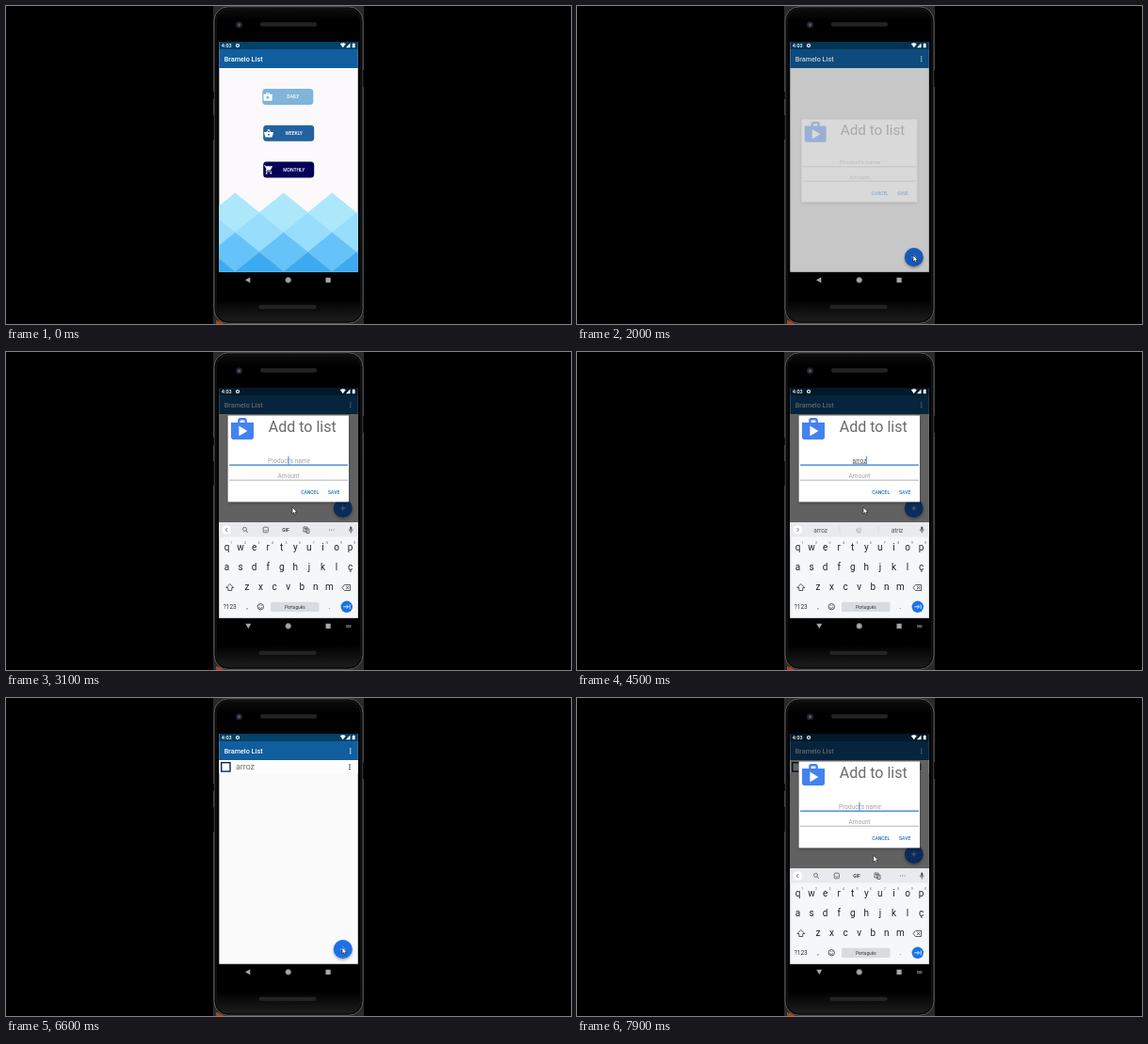
Recreate the animation shown at these times as an HTML page. Size 600 by 338 pixels, loop 8 s.

```html
<!DOCTYPE html>
<html lang="en">
<head>
<meta charset="utf-8">
<title>Shopping list demo</title>
<style>
html, body { margin: 0; width: 100%; height: 100%; overflow: hidden; background: #000; }
svg { display: block; width: 100vw; height: 100vh; font-family: Roboto, sans-serif; }
.mid { text-anchor: middle; }
.med { font-weight: 500; }
</style>
</head>
<body>
<svg viewBox="0 0 600 338">
  <defs>
    <clipPath id="view"><rect x="226.300" y="38" width="147.500" height="244.700"/></clipPath>
    <linearGradient id="body" x2="0" y2="1">
      <stop offset="0" stop-color="#0d0d0d"/><stop offset=".04" stop-color="#000"/>
      <stop offset=".93" stop-color="#000"/><stop offset="1" stop-color="#1d1d1d"/>
    </linearGradient>
    <filter id="shade" x="-20%" y="-20%" width="140%" height="150%">
      <feDropShadow dx="0" dy="1.5" stdDeviation="1.5" flood-opacity=".35"/>
    </filter>
    <path id="shop" fill-rule="evenodd" d="M16 6V4c0-1.1-.9-2-2-2h-4c-1.1 0-2 .9-2 2v2H2v13c0 1.1.9 2 2 2h16c1.1 0 2-.9 2-2V6zM10 4h4v2h-4zM9 18V9l7.5 4.5z"/>
    <path id="basket" fill-rule="evenodd" d="M17.2 9 12.8 2.4Q12 1.6 11.2 2.4L6.8 9H1l2.6 10.5Q4 21 5.5 21h13q1.5 0 1.9-1.5L23 9zM9 9l3-4.4L15 9zM12 13a2 2 0 1 0 0 4a2 2 0 1 0 0-4z"/>
    <g id="cart">
      <path d="M1 2h3.3l.9 2H21l-4.5 8.5q-.5.5-1 .5H8.1l-1 2H19v2H7q-3-.5-1.8-3L6.6 11.6 3 4H1z"/>
      <circle cx="7" cy="20" r="2"/><circle cx="17" cy="20" r="2"/>
    </g>
    <g id="bar">
      <path d="M226 38h148v8H226z" fill="#044068"/>
      <path d="M226 46h148v20H226z" fill="#105e9e"/>
      <text class="med" x="231.7" y="58.9" font-size="7.25" fill="#fff">Bramelo List</text>
    </g>
    <g id="dots"><circle cy="-2.3" r=".8"/><circle r=".8"/><circle cy="2.3" r=".8"/></g>
  </defs>

  <rect width="600" height="338"/>
  <rect x="220" width="160" height="338" fill="#2a2a2a"/>
  <rect x="221" y=".8" width="158" height="336.5" rx="15" fill="#080808" stroke="#5c5c5c"/>
  <rect x="223.3" y="3" width="153.4" height="332" rx="13" fill="url(#body)" stroke="#1c1c1c" stroke-width=".7"/>
  <path d="M220.5 91v8M220.5 116v26M379.5 68v18" stroke="#111"/>
  <path d="M272 19.5h56M270.5 319.8h57" stroke="#232323" stroke-width="4.3" stroke-linecap="round"/>
  <circle cx="247.5" cy="20" r="3.5" fill="#20232b"/><circle cx="247.5" cy="20" r="1.7" fill="#4c5468"/>
  <path d="M223 338v-4l4 1 5 3z" fill="#a3441d"/>

  <g clip-path="url(#view)">
    <g id="home">
      <path d="M226 38h148v245H226z" fill="#fbf9fc"/>
      <g id="tiles"></g>
      <use href="#bar"/>
      <g id="choices"></g>
    </g>
    <g id="list">
      <path d="M226 38h148v245H226z" fill="#fafafa"/>
      <use href="#bar"/>
      <use href="#dots" x="365.7" y="56.3" fill="#fff"/>
      <g id="row">
        <path d="M226 66h148v14H226z" fill="#fdfdfd"/>
        <rect x="228.7" y="68.7" width="9.3" height="9.3" fill="#fff" stroke="#102458" stroke-width="1.4"/>
        <text x="244" y="76.1" font-size="8.8" fill="#707070">arroz</text>
        <use href="#dots" x="365" y="73.3" fill="#222"/>
      </g>
      <g id="fab" filter="url(#shade)">
        <circle cx="357.8" cy="267" r="10" fill="#1a70e8"/>
        <path d="M355.3 267h5M357.8 264.5v5" stroke="#fff" stroke-width=".9"/>
      </g>
    </g>
    <path id="dim" d="M226 38h148v245H226z"/>
    <g id="dialog">
      <path d="M235.7 118.5h128.3v91.8H235.7z" fill="#fff" filter="url(#shade)"/>
      <use href="#shop" transform="translate(236.6 118.7) scale(1.2)" fill="#4481f2"/>
      <text x="278.8" y="136" font-size="16" fill="#6b6b6b">Add to list</text>
      <g class="mid" font-size="6.5">
        <text id="hint" x="300.5" y="168.5" fill="#a0a0a0">Product's name</text>
        <text id="word" x="300" y="168.5" fill="#555" text-decoration="underline"></text>
        <text x="300" y="184.6" fill="#a0a0a0">Amount</text>
      </g>
      <path id="line" d="M237 171.2h126"/>
      <path d="M237 187.2h126" stroke="#929292" stroke-width=".7"/>
      <path id="caret" stroke="#2a72d0" stroke-width=".8"/>
      <g class="med" font-size="5" fill="#1c70bd">
        <text x="313.2" y="202.2">CANCEL</text><text x="342" y="202.2">SAVE</text>
      </g>
    </g>
    <g id="keyboard">
      <path d="M226 181h148v102H226z" fill="#f6f7f9"/>
      <path d="M226 181h148v15.5H226z" fill="#e8eaed"/>
      <circle cx="234.3" cy="189" r="4.8" fill="#fff"/>
      <path id="chevron" fill="none" stroke="#555" stroke-width=".8"/>
      <g fill="none" stroke="#555" stroke-width=".8">
        <g id="tools">
          <circle cx="253.5" cy="188.3" r="2"/><path d="M255 190l2 2"/>
          <rect x="273.2" y="186.2" width="5.2" height="5.6" rx="1"/><path d="M274.5 189.5q1.5 1.5 2.8 0"/>
          <path d="M316 186h4v5h-4zM318 188h4v4.5h-3zM317 187.5h2"/>
          <path d="M343 189h.8M345.3 189h.8M347.6 189h.8" stroke-width="1"/>
          <text class="mid" x="297" y="191" font-size="5" font-weight="700" fill="#444" stroke="none">GIF</text>
        </g>
        <rect x="365.3" y="185.5" width="2" height="4" rx="1" fill="#444" stroke="none"/>
        <path d="M364.3 188.5q0 2 2 2t2-2M366.3 190.5v2"/>
      </g>
      <g id="words" class="mid" font-size="6.5" fill="#50545a">
        <text id="guess" x="258.7" y="191.5"></text><text id="guess2" x="340" y="191.5"></text>
        <path d="M279 185v8M320 185v8" stroke="#ccc" stroke-width=".5"/>
        <circle cx="299.5" cy="189.3" r="2.8" fill="#d1d4d8"/><path d="M297 188a2.8 2.8 0 0 0 4.5 3.2" fill="none" stroke="#aaa" stroke-width=".7"/>
      </g>
      <g id="keys" class="mid" fill="#222"></g>
      <g fill="none" stroke="#333" stroke-width=".8">
        <path d="M237.8 246.5l-4 4h2v3h4v-3h2zM357 250.5l2.5-3h6v6h-6zM361 249l3 3M364 249l-3 3"/>
        <circle cx="270.3" cy="270.7" r="3.2"/><path d="M268.5 271.3q1.8 2.5 3.6 0M269 269.3h.8M270.9 269.3h.8"/>
      </g>
      <rect x="281" y="265.7" width="51.5" height="10.3" rx="1.5" fill="#d8dbdf"/>
      <g class="mid" fill="#333">
        <text x="237.7" y="273" font-size="6.5">?123</text>
        <text x="256" y="273" font-size="8">,</text><text x="343.3" y="273" font-size="8">.</text>
        <text x="306.8" y="272.5" font-size="4.7">Português</text>
      </g>
      <circle cx="361.8" cy="270.8" r="6.2" fill="#1a73e8"/>
      <path d="M358.3 270.8h5M361.5 268.8l2 2-2 2M365.2 268.5v4.6" fill="none" stroke="#fff" stroke-width=".8"/>
    </g>
  </g>

  <g fill="#fff">
    <text class="med" x="228.8" y="44.2" font-size="5.5">4:03</text>
    <circle cx="246" cy="42" r="1.5" fill="none" stroke="#fff" stroke-width="1.2"/>
    <path d="M354.8 40.2q3-1.8 6 0l-3 4zM365.5 39.6v4.6h-4.6zM367.8 40h.8v-.6h1.2v.6h.8v4.3h-2.8z"/>
  </g>
  <g fill="#a7a7a7">
    <path id="back"/>
    <circle cx="299.7" cy="291.3" r="2.8" stroke="#777"/>
    <path d="M339.5 288.7h5.2v5.2h-5.2z"/>
    <path id="imeKey" d="M361 290h5.5v3H361z" fill="#555"/>
  </g>
  <path id="cursor" d="M0 0v7l1.7-1.4 1.2 2.5 1.2-.6-1.2-2.4 2.2-.2z" fill="#fff" stroke="#222" stroke-width=".7"/>
</svg>
<script>
const LOOP = 8000, STEP = 100;
const $ = id => document.getElementById(id);
const set = (id, attrs) => { for (const k in attrs) $(id).setAttribute(k, attrs[k]); };
const show = (id, on) => set(id, { visibility: on ? 'visible' : 'hidden' });
const ramp = (t, a, b) => Math.min(1, Math.max(0, (t - a) / (b - a)));
const easeOut = p => 1 - (1 - p) ** 2;
const smooth = p => p * p * (3 - 2 * p);

// Diamond rows, back to front
let tiles = '';
['#ade8fa', '#97defd', '#66c3fa', '#3daaf0'].forEach((fill, r) => {
  for (let i = -1; i < 4; i++) {
    const x = 243.3 + i * 51.5 + (r % 2) * 25.75, y = 198.5 + r * 21;
    tiles += `<path d="M${x} ${y}l26 21-26 21.5-26-21.5z" fill="${fill}"/>`;
  }
});
$('tiles').innerHTML = tiles;

$('choices').innerHTML = [
  ['DAILY', 'shop', 272.3, 88, '#80b4d9'],
  ['WEEKLY', 'basket', 273.2, 126.8, '#2362a0'],
  ['MONTHLY', 'cart', 273.2, 165.5, '#050158']
].map(([label, icon, x, y, fill]) =>
  `<rect x="${x}" y="${y}" width="54" height="17" rx="3.5" fill="${fill}"/>
   <use href="#${icon}" transform="translate(${x + .3} ${y + 3}) scale(.46)" fill="#fff"/>
   <text class="mid med" x="${x + 32.5}" y="${y + 10.4}" font-size="5" fill="#fff">${label}</text>`).join('');

$('keys').innerHTML = [['qwertyuiop', 234.5], ['asdfghjklç', 234.5], ['zxcvbnm', 256]]
  .map(([row, x0], r) => [...row].map((c, i) => {
    const x = x0 + i * 14.56, y = 211 + r * 21.2;
    return `<text x="${x}" y="${y}" font-size="10">${c}</text>` +
      (r ? '' : `<text x="${x + 4.8}" y="${y - 7}" font-size="3.5" fill="#666">${(i + 1) % 10}</text>`);
  }).join('')).join('');

// Pointer stops: time, x, y
const stops = [
  [100, 330, 338], [800, 310, 102], [1200, 310, 102], [1800, 357, 265], [2100, 357, 265],
  [2300, 350, 247], [2700, 304, 165], [5000, 304, 165], [5300, 348, 147], [5500, 348, 147],
  [5700, 359, 179], [6300, 357, 265], [6800, 357, 265], [7300, 314.7, 167.3], [LOOP, 314.7, 167.3]
];
function pointer(t) {
  const i = Math.max(1, stops.findIndex(s => s[0] >= t));
  const [a, x, y] = stops[i - 1], [b, u, v] = stops[i];
  const p = smooth(ramp(t, a, b));
  return [x + (u - x) * p, y + (v - y) * p];
}

const typedAt = [3600, 3700, 4100, 4300, 4400];

function draw(t) {
  const second = t >= 6500;
  const scale = .9 + .1 * easeOut(ramp(t, 900, 1200));
  set('list', {
    opacity: ramp(t, 900, 1100),
    transform: `translate(300 167) scale(${scale}) translate(-300 -167)`
  });
  show('home', t < 1100);
  show('row', t >= 5400);

  const rise = easeOut(second ? ramp(t, 7400, 7700) : ramp(t, 2800, 3100));
  const keys = second ? rise : rise * (1 - ramp(t, 5300, 5600));
  const open = second ? ramp(t, 6600, 6900) : ramp(t, 1900, 2200) - ramp(t, 5300, 5500);
  const dim = second ? open : ramp(t, 1900, 2200) - ramp(t, 5300, 5600);
  const grow = .9 + .1 * easeOut(open);

  set('dim', { opacity: .61 * dim });
  set('fab', { transform: `translate(0 ${keys === 1 ? -101 : 0})` });
  set('dialog', {
    opacity: open,
    transform: `translate(300 ${164.5 - 51 * rise}) scale(${grow}) translate(-300 -164.5)`
  });
  set('keyboard', { transform: `translate(0 ${102 * (1 - keys)})` });
  show('keyboard', keys > 0);

  const word = second ? '' : 'arroz'.slice(0, typedAt.filter(at => t >= at).length);
  const focus = rise > 0;
  $('word').textContent = word;
  set('hint', { opacity: word ? 0 : 1 });
  set('line', { stroke: focus ? '#3078d3' : '#929292', 'stroke-width': focus ? 1.2 : .7 });
  const x = 300 + (word ? $('word').getComputedTextLength() / 2 : 0);
  set('caret', { d: `M${x} 161.5v9`, opacity: focus && !(t >= 4700 && t < 5100) ? 1 : 0 });

  set('tools', { opacity: word ? 0 : 1 });
  set('words', { opacity: word ? 1 : 0 });
  set('chevron', { d: word ? 'M233.5 187l2 2-2 2' : 'M235.2 187l-2 2 2 2' });
  $('guess').textContent = word;
  $('guess2').textContent = word.length > 2 ? 'atriz' : 'as';

  set('back', { d: keys > 0 ? 'M254.3 288.8h6l-3 5.2z' : 'M259.3 288.3v6l-5.3-3z' });
  show('imeKey', keys > 0);
  const [px, py] = pointer(t);
  set('cursor', { transform: `translate(${px} ${py})` });
  show('cursor', t >= 100);
}

const start = performance.now();
function tick() {
  const t = (performance.now() - start) % LOOP;
  draw(Math.floor(t / STEP) * STEP);
  requestAnimationFrame(tick);
}
tick();
</script>
</body>
</html>
```
